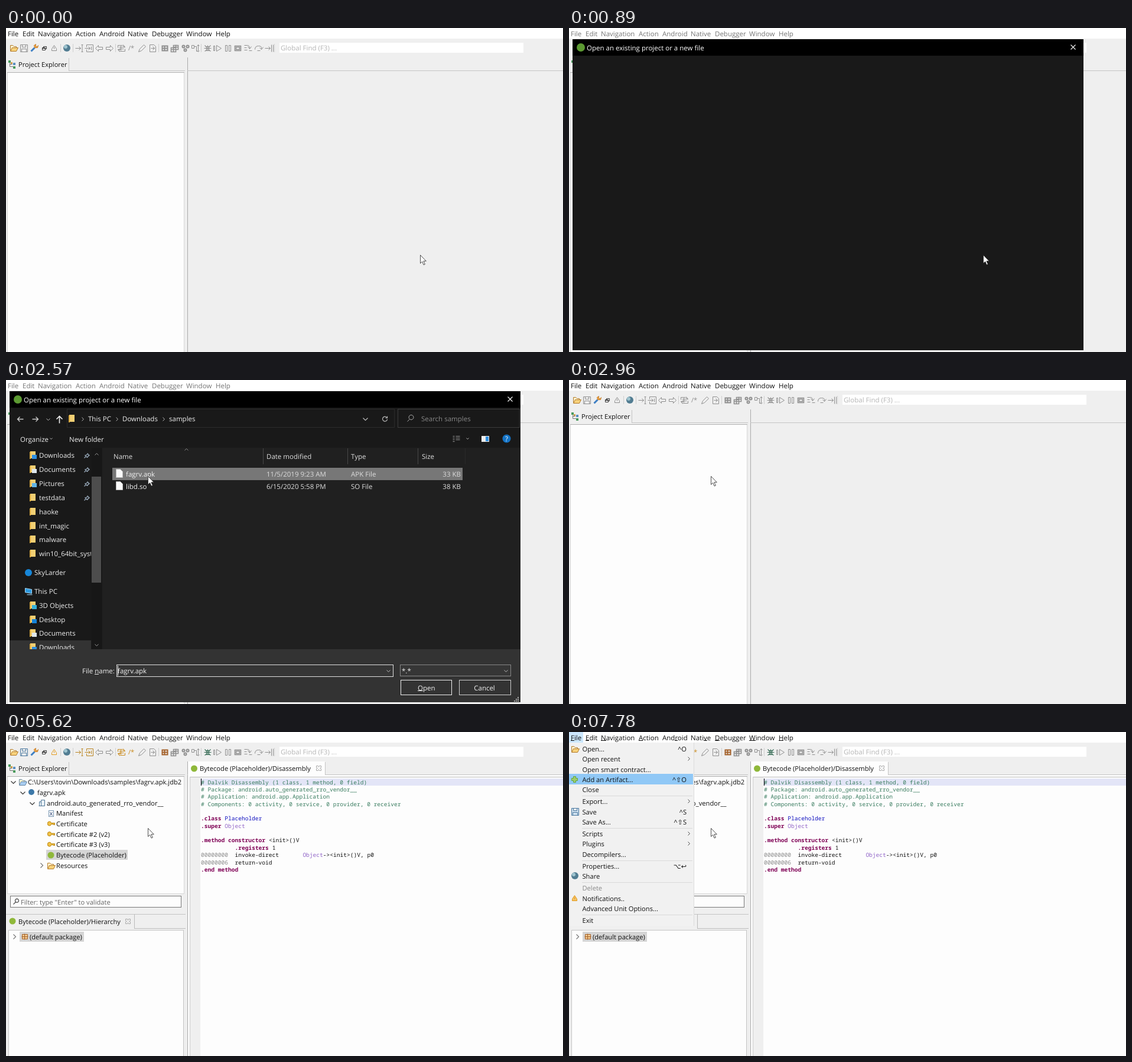
An HTML page with a canvas for the animation above (8000 ms loop, 943 px wide and 550 px high).

```html
<!DOCTYPE html>
<html lang="en">
<head>
<meta charset="utf-8">
<title>Opening a project</title>
<style>
  html, body { margin: 0; width: 100%; height: 100%; overflow: hidden; background: #efefef; }
  canvas { display: block; }
</style>
</head>
<body>
<canvas id="stage" width="943" height="550"></canvas>
<script>
const ctx = document.getElementById('stage').getContext('2d');
const uiFont = size => `${size}px "Open Sans", "DejaVu Sans", sans-serif`;
const PANEL = uiFont(11.15), WINDOW = uiFont(11.5);
const MONO = '9.57px "Noto Sans Mono", monospace';
const GREY = '#8f8f8f';
let face = PANEL;

// ---- drawing helpers (text is placed by its vertical centre) ----
function rect(x, y, w, h, color) {
  ctx.fillStyle = color;
  ctx.fillRect(x, y, w, h);
}
function frame(x, y, w, h, color, fill) {
  if (fill) rect(x, y, w, h, fill);
  ctx.lineWidth = 1;
  ctx.strokeStyle = color;
  ctx.strokeRect(x + .5, y + .5, w - 1, h - 1);
}
function text(s, x, y, color = '#111', align = 'left', font = face) {
  ctx.font = font;
  ctx.fillStyle = color;
  ctx.textAlign = align;
  ctx.fillText(s, x, y + 4);
}
function underline(s, i, x, y, color = '#111') {
  ctx.font = face;
  const from = ctx.measureText(s.slice(0, i)).width;
  rect(Math.round(x + from), y + 4, Math.round(ctx.measureText(s[i]).width), 1, color);
}
function shape(x, y, d, stroke, fill, width = 1) {
  const path = new Path2D(d);
  ctx.save();
  ctx.translate(x + .5, y + .5);
  if (fill) { ctx.fillStyle = fill; ctx.fill(path); }
  if (stroke) { ctx.strokeStyle = stroke; ctx.lineWidth = width; ctx.stroke(path); }
  ctx.restore();
}
function dot(x, y, r, color) {
  ctx.fillStyle = color;
  ctx.beginPath();
  ctx.arc(x, y, r, 0, 7);
  ctx.fill();
}

// ---- icons ----
const DISK = 'M-6-6h12v12h-12zM-3-6v4h6v-4M-4 6v-5h8v5';
const WARN = 'M0-5l4 6v3h-8v-3zM0-2v3';
const PAGE = 'M-5-7h7l4 4v10h-11z';
const GRID = 'M-4-4h9v8h-9zM0-5v10M-5 0h11';
const chevron = {
  right: (x, y, c = '#777') => shape(x, y, 'M-2-4l4 4l-4 4', c, null, 1.2),
  down: (x, y, c = '#333') => shape(x, y, 'M-4-2l4 4l4-4', c, null, 1.2),
  up: (x, y, c) => shape(x, y, 'M-3 2l3-3l3 3', c)
};
function folder(x, y, fill = '#f7d27c', line = '#b27a28') {
  shape(x, y, 'M-6 4v-9h4l2 2h4v2', line, '#fff3cf');
  shape(x, y, 'M-6 5l3-6h10l-3 6z', line, fill);
}
function globe(x, y) {
  dot(x, y, 6, '#527d92');
  dot(x - 2, y - 2, 3, '#9fc4cf');
}
function key(x, y) {
  shape(x, y, 'M-6 0a3 3 0 0 1 6-1h6v3h-2v-1h-4a3 3 0 0 1-6-1z', '#b98512', '#f2c347');
}
function closeMark(x, y) {
  shape(x, y, 'M-4-4h3l1 2l1-2h3v3l-2 1l2 1v3h-3l-1-2l-1 2h-3v-3l2-1l-2-1z', '#aaa');
}
function pointer(x, y) {
  shape(x, y, 'M0 0v14l3.2-3 2.4 5.6 2.2-1-2.4-5.4h4.4z', '#222', '#fff', .8);
}

// x, path, colour once a project is open, line width
const tools = [
  [30, DISK, '#48779f'],
  [65, 'M-4-1h5v4h-5zM-4 0h5M-2-1v-2h5v4h-2', '#333'],
  [81, WARN, '#e39a1c'],
  [123, 'M-6 0h9M0-3l3 3l-3 3M4-6h3M4 6h3M5.5-6v12', '#b9831e'],
  [140, 'M-4-2v-4h11v12h-11v-4M-7 0h9M-1-3l3 3l-3 3M4-3v6', '#b9831e'],
  [157, 'M-6 0l5-5v3h7v4h-7v3z'],
  [175, 'M6 0l-5-5v3h-7v4h7v3z'],
  [195, 'M-6-1l0-4h8l4 3M3-6l3 4h-4M6 1v4h-8l-4-3M-3 6l-3-4h4M-4-2h8M-4 1h8M-1-4v8', '#c98a1c'],
  [230, 'M-6 6l2-5l7-7l3 3l-7 7z'],
  [248, 'M-5-6h7l3 3v9h-10zM-3 0h6M0-3l3 3l-3 3'],
  [268, GRID, '#a4622c', 2],
  [285, 'M-6-1h8v7h-8zM-2-1v7M-6 2h8M-2-1v-4h8v7h-4M2-6v4M-2-2h8', 0, 1.6],
  [303, 'M-5-3a2 2 0 1 0 4 0a2 2 0 1 0-4 0M2-3a2 2 0 1 0 4 0a2 2 0 1 0-4 0M-2 3a2 2 0 1 0 4 0a2 2 0 1 0-4 0', 0, 2],
  [320, 'M-6-5h4v5h-4zM-2-3h4v8h2M5-6v11M3-4l2-2l2 2M3 4l2 2l2-2'],
  [341, 'M-2-3h4v7h-4zM-5-5l3 3M5-5l-3 3M-6 0h12M-5 5l3-2M5 5l-3-2M0-5v9', '#356b55', 1.2],
  [358, 'M-7-4h2v8h-2zM-2-5l8 5l-8 5z'],
  [375, 'M-4-5h3v10h-3zM2-5h3v10h-3z'],
  [392, 'M-5-4h10v8h-10zM-3-2h6v4h-6z', 0, 1.5],
  [409, 'M-6-5h5q4 0 4 5M0-3l3 4l3-4M-6-1h4M-6 3h5M2 4h5'],
  [427, 'M-6 2q0-6 6-6t5 5M2-1l3 3l3-4M-2 4h5'],
  [445, 'M-7 0h9M-1-3l3 3l-3 3M4-6v12M7-6v12']
];

const menus = [['File', 3, 0], ['Edit', 28, 0], ['Navigation', 54, 0], ['Action', 118, 0], ['Android', 158, 3],
  ['Native', 206, 4], ['Debugger', 247, 0], ['Window', 305, 0], ['Help', 355, 0]];

function menuBar(t) {
  const modal = (t >= 890 && t < 2960) || (t >= 3450 && t < 3830);
  const mnemonics = (t >= 390 && t < 890) || t >= 6720;
  face = WINDOW;
  rect(0, 0, 943, 18, '#fff');
  if ((t >= 590 && t < 890) || t >= 6800) rect(0, 0, 24, 18, '#cce8ff');
  for (const [name, x, i] of menus) {
    text(name, x, 10, modal ? '#757575' : '#111');
    if (mnemonics) underline(name, i, x, 10);
  }
  face = PANEL;
}

function toolBar(loaded) {
  folder(13, 34);
  for (const [x, d, active, width] of tools) {
    shape(x, 34, d, active && (loaded || x === 65) ? active : GREY, null, width);
  }
  shape(47, 34, 'M-5 5l6-6', '#3d7fc4', null, 3);
  shape(47, 34, 'M1-1l-1-4l3-2v4h3l1-2l-1 4z', '#c77f2a', '#f0a84b');
  globe(103, 34);
  text('/*', 207, 34, loaded ? '#c98a1c' : GREY);
  for (const x of [92, 113, 185, 258, 330, 454]) rect(x, 27, 1, 14, '#cfcfcf');
  rect(463, 25, 413, 17, '#fff');
  text('Global Find (F3) ...', 465, 34, '#b5b5b5', 'left', WINDOW);
}

function shell(loaded) {
  rect(0, 18, 943, 532, '#efefef');
  toolBar(loaded);
  rect(307, 50, 1, 500, '#aaa');
  rect(307, 72, 636, 1, '#c4c4c4');
  rect(106, 51, 1, 22, '#c4c4c4');
  rect(106, 72, 197, 1, '#c4c4c4');
  shape(10, 61, 'M-4-2v6h7M0 0h-4', '#777');
  rect(4, 55, 4, 4, '#4a9a5c');
  rect(8, 58, 3, 3, '#d2a04a');
  rect(12, 59, 4, 4, '#5a8fc0');
  rect(12, 65, 4, 4, '#4a9a5c');
  text('Project Explorer', 21, 62);
  frame(2, 75, 300, 480, '#d6d6d6', '#fdfdfd');
  rect(2, 75, 300, 1, '#b0b0b0');
}

function projectRoot(open) {
  (open ? chevron.down : chevron.right)(12, 85);
  folder(28, 85, '#a9cdf0', '#6788a6');
  text('C:\\Users\\tovin\\Downloads\\samples\\fagrv.apk.jdb2', 37, 85);
}

function tree() {
  chevron.down(28, 103);
  dot(43, 102, 5, '#3d78a8');
  text('fagrv.apk', 53, 103);
  chevron.down(44, 121);
  shape(61, 120, 'M-2-5h6v10h-6zM-5 5v-7h3M-6 5h5', '#4d7392', '#e8f1f8');
  text('android.auto_generated_rro_vendor__', 69, 121);
  frame(72, 133, 9, 11, '#7594b0', '#fff');
  text('x', 73.5, 138, '#263f70');
  text('Manifest', 85, 138);
  ['Certificate', 'Certificate #2 (v2)', 'Certificate #3 (v3)'].forEach((s, i) => {
    key(76, 155 + i * 17.6);
    text(s, 85, 156 + i * 17.6);
  });
  rect(68, 200, 138, 17, '#d5d5d5');
  dot(76, 209, 5.5, '#8fb83a');
  text('Bytecode (Placeholder)', 85, 209);
  chevron.right(60, 226);
  folder(76, 227);
  text('Resources', 85, 227);
  rect(0, 275, 303, 33, '#efefef');
  rect(2, 274, 300, 1, '#d6d6d6');
  frame(7, 278, 290, 20, '#777', '#fdfdfd');
  shape(17, 287, 'M-5 5l4-4M-1 1a3 3 0 1 1 4 0a3 3 0 0 1-4 0', '#555', null, 1.3);
  text('Filter: type "Enter" to validate', 25, 289, '#666');
}

function hierarchy(filled) {
  rect(0, 308, 304, 242, '#efefef');
  rect(0, 309, 304, 1, '#c4c4c4');
  rect(217, 309, 1, 24, '#bbb');
  rect(217, 333, 87, 1, '#bbb');
  dot(11, 321, 5.5, '#8fb83a');
  text('Bytecode (Placeholder)/Hierarchy', 21, 322);
  closeMark(206, 321);
  frame(4, 336, 297, 220, '#c4c4c4', '#fdfdfd');
  if (!filled) return;
  chevron.right(14, 347);
  rect(23, 339, 109, 17, '#d5d5d5');
  shape(31, 347, GRID, '#a4622c', '#efc58b');
  text('(default package)', 40, 348);
}

const GREEN = '#3a7d60', KEYWORD = '#7f0055', BLUE = '#1212c0', PURPLE = '#9266c8', ADDRESS = '#8a8a8a', PLAIN = '#111';
// row, column, text, colour
const code = [
  [0, 0, '# Dalvik Disassembly (1 class, 1 method, 0 field)', GREEN],
  [1, 0, '# Package: android.auto_generated_rro_vendor__', GREEN],
  [2, 0, '# Application: android.app.Application', GREEN],
  [3, 0, '# Components: 0 activity, 0 service, 0 provider, 0 receiver', GREEN],
  [5, 0, '.class', KEYWORD], [5, 7, 'Placeholder', BLUE],
  [6, 0, '.super', KEYWORD], [6, 7, 'Object', PURPLE],
  [8, 0, '.method constructor', KEYWORD], [8, 20, '<init>()V', PLAIN],
  [9, 10, '.registers', KEYWORD], [9, 21, '1', PLAIN],
  [10, 0, '00000000', ADDRESS], [10, 10, 'invoke-direct', PLAIN], [10, 30, 'Object', PURPLE], [10, 36, '-><init>()V, p0', PLAIN],
  [11, 0, '00000006', ADDRESS], [11, 10, 'return-void', PLAIN],
  [12, 0, '.end method', KEYWORD]
];

function editor(t) {
  rect(308, 50, 232, 23, '#fdfdfd');
  rect(540, 51, 1, 21, '#c4c4c4');
  rect(308, 73, 635, 477, '#fdfdfd');
  rect(311, 76, 632, 1, '#bbb');
  rect(311, 76, 1, 474, '#ccc');
  rect(312, 77, 17, 473, '#efefef');
  dot(318.5, 62, 5.5, '#8fb83a');
  text('Bytecode (Placeholder)/Disassembly', 328, 62);
  closeMark(529, 61);
  if (t < 4620) return;
  rect(329, 79, 614, 12, '#e3e5f7');
  for (const [row, col, s, color] of code) {
    text(s, 330 + col * 5.746, 84.5 + row * 12.37, color, 'left', (color === KEYWORD ? 'bold ' : '') + MONO);
  }
  if (t < 5210 || (t >= 5620 && t < 6210) || t >= 6720) rect(330, 79, 1, 12, '#000');
}

// label, y, shortcut, 1 = needs an open project, 2 = never enabled
const fileItems = [
  ['Open...', 29, '^O'], ['Open recent', 46, '>'], ['Open smart contract...', 63.5], ['Add an Artifact...', 81, '^⇧O', 1],
  ['Close', 98, '', 1], ['Export...', 118, '>', 1], ['Save', 135.5, '^S', 1], ['Save As...', 153, '^⇧S', 1],
  ['Scripts', 173, '>'], ['Plugins', 190, '>'], ['Decompilers...', 208], ['Properties...', 228, '⌥↩', 1],
  ['Share', 245], ['Delete', 265, '', 2], ['Notifications..', 283, '', 1], ['Advanced Unit Options...', 300, '', 1], ['Exit', 320]
];

function fileMenu(t, loaded) {
  const selected = t < 590 ? -1 : t < 6720 ? 0 : t < 6800 ? -1 : t < 7200 ? 0 : t < 7380 ? 1 : t < 7780 ? 2 : 3;
  rect(0, 18, 212, 311, '#f1f1f1');
  rect(211, 18, 1, 311, '#dcdcdc');
  for (const y of [108, 163, 218, 255, 310]) rect(22, y, 187, 1, '#dadada');
  fileItems.forEach(([label, y, hint, need], i) => {
    const color = need === 2 || (need && !loaded) ? '#888' : '#111';
    if (i === selected) rect(0, Math.round(y - 10), 210, 18, '#90c8f6');
    text(label, 22.5, y, color);
    if (hint === '>') shape(202, y - 1, 'M-1-3l3 3l-3 3', '#444');
    else if (hint) text(hint, 199, y, color, 'right');
  });
  folder(10, 29);
  shape(9, 80, 'M-2-5h4v3h3v4h-3v3h-4v-3h-3v-4h3z', loaded ? '#62a83c' : '#aaa', loaded ? '#9bcb6c' : '#ccc');
  shape(10, 135, DISK, loaded ? '#48779f' : '#aaa', loaded ? '#cfe0ee' : null);
  globe(10, 244);
  shape(9, 282, WARN, loaded ? '#e39a1c' : '#aaa', loaded ? '#f3c266' : null);
}

// label, x, y, icon accent
const places = [
  ['Downloads', 56, 128, '#2f8fe0'], ['Documents', 56, 152, '#dfe8ee'], ['Pictures', 56, 176, '#63b5e8'], ['testdata', 56, 200],
  ['haoke', 56, 224], ['int_magic', 56, 248], ['malware', 56, 271], ['win10_64bit_syst', 56, 295],
  ['SkyLarder', 48, 327], ['This PC', 48, 359], ['3D Objects', 56, 383, '#35b0d8'], ['Desktop', 56, 407, '#1683d8'],
  ['Documents', 56, 430, '#dfe8ee'], ['Downloads', 56, 454, '#2f8fe0']
];

function sidebar() {
  ctx.save();
  ctx.beginPath();
  ctx.rect(6, 115, 138, 342);
  ctx.clip();
  rect(6, 442, 138, 15, '#333');
  for (const [label, x, y, accent] of places) {
    text(label, x, y, '#eee');
    if (x === 48) continue;
    rect(41, y - 7, 9, 12, '#f2cf73');
    rect(40, y - 6, 2, 12, '#d9a93e');
    if (accent) rect(44, y - 1, 8, 7, accent);
  }
  dot(38, 327, 6, '#1787d9');
  shape(38, 358, 'M-6-5l11 2v7l-11-2zM-3 6h9', '#a8d8f5', '#2e9ae0');
  for (const y of [128, 152, 176, 200]) shape(136, y, 'M-4 4l3-3M-3-1l4 4M-2 0l4-3l2 2l-3 4M1-4l4 4', '#9ab', null, 1.3);
  ctx.restore();
  rect(145, 115, 17, 342, '#171717');
  rect(145, 164, 16, 180, '#4d4d4d');
  chevron.up(153, 125, '#999');
  shape(153, 449, 'M-3-1l3 3l3-3', '#999');
}

function fileList(t) {
  rect(163, 115, 708, 342, '#202020');
  for (const x of [435, 578, 697, 777]) rect(x, 116, 1, 27, x === 777 ? '#2a2a2a' : '#484848');
  chevron.up(305, 117, '#888');
  [['Name', 182], ['Date modified', 441], ['Type', 584], ['Size', 704]].forEach(([s, x]) => text(s, x, 130, '#ddd'));
  if (t >= 2260) rect(180, 149, 593, 21, t < 2570 ? '#4d4d4d' : '#777');
  [['fagrv.apk', '11/5/2019 9:23 AM', 'APK File', '33 KB'], ['libd.so', '6/15/2020 5:58 PM', 'SO File', '38 KB']].forEach((row, i) => {
    const y = 160 + i * 21.3;
    shape(191, Math.round(y) - 2, PAGE, '#bbb', '#fafafa');
    text(row[0], 203, y, '#f2f2f2');
    text(row[1], 441, y, '#ddd');
    text(row[2], 584, y, '#ddd');
    text(row[3], 770, y, '#ddd', 'right');
  });
}

function addressBar() {
  frame(103, 49, 555, 32, '#2b2b2b');
  frame(663, 49, 207, 32, '#3c3c3c');
  shape(24, 66, 'M5 0h-10M-1-4l-4 4l4 4', '#ccc', null, 1.3);
  shape(49, 66, 'M-5 0h10M1-4l4 4l-4 4', '#ccc', null, 1.3);
  shape(71, 66, 'M-3-1l3 3l3-3', '#bbb');
  shape(90, 67, 'M0 6v-12M-5-1l5-5l5 5', '#eee', null, 1.6);
  rect(107, 59, 9, 12, '#f2cf73');
  rect(106, 60, 2, 12, '#d9a93e');
  for (const x of [129, 187, 266]) shape(x, 66, 'M-1-3l3 3l-3 3', '#bbb');
  text('This PC', 139, 66, '#eee');
  text('Downloads', 197, 66, '#eee');
  text('samples', 276, 66, '#eee');
  chevron.down(608, 66, '#bbb');
  shape(641, 66, 'M3-3a4 4 0 1 0 1 3M4-5v3h-3', '#bbb', null, 1.2);
  shape(684, 65, 'M-5 5l4-4M-1 1a4 4 0 1 1 5 0a4 4 0 0 1-5 0', '#aaa');
  text('Search samples', 703, 66, '#888');
  text('Organize', 24, 101, '#eee');
  shape(76, 99, 'M-2-1l2 2l2-2', '#bbb');
  text('New folder', 107, 101, '#eee');
  shape(762, 99, 'M-6-4h3M-1-4h7M-6-1h3M-1-1h7M-6 2h3M-1 2h7M-6 5h3', '#999');
  shape(781, 99, 'M-2-1l2 2l2-2', '#bbb');
  rect(805, 95, 13, 10, '#eee');
  rect(812, 96, 5, 8, '#2f8fe0');
  dot(847.5, 99.5, 7, '#1473c5');
  text('?', 847.5, 100, '#fff', 'center');
}

function fileNameArea(t) {
  rect(6, 457, 865, 90, '#333');
  text('File name:', 129, 494, '#eee');
  underline('File name:', 5, 129, 495, '#eee');
  frame(187, 483, 469, 21, '#e0e0e0', '#363636');
  frame(667, 483, 188, 20, '#888', '#363636');
  shape(647, 493, 'M-3-1l3 3l3-3', '#bbb');
  shape(846, 493, 'M-3-1l3 3l3-3', '#bbb');
  if (t >= 2570) text('fagrv.apk', 189, 494, '#f2f2f2');
  if (t < 1580 || t >= 2070) rect(189, 485, 1, 17, '#eee');
  text('*.*', 670, 494, '#eee');
  frame(668, 509, 87, 26, '#f0f0f0');
  frame(767, 509, 88, 26, '#d0d0d0');
  text('Open', 697, 523, '#f2f2f2');
  underline('Open', 0, 697, 523, '#f2f2f2');
  text('Cancel', 810, 523, '#f2f2f2', 'center');
  for (let i = 0; i < 3; i++) for (let j = 2 - i; j < 3; j++) rect(860 + j * 3, 538 + i * 3, 2, 2, '#aaa');
}

function openDialog(t) {
  face = WINDOW;
  rect(6, 19, 865, 528, '#191919');
  rect(6, 19, 865, 28, '#000');
  dot(20, 33, 7, '#5c9a32');
  text('Open an existing project or a new file', 30, 34, '#fff');
  shape(853, 32, 'M-4-4l8 8M4-4l-8 8', '#eee', null, 1.2);
  if (t >= 1180) {
    addressBar();
    sidebar();
    fileList(t);
    fileNameArea(t);
  }
  face = PANEL;
}

function loadingPanel() {
  frame(252, 97, 700, 460, '#b0b0b0', '#f0f0f0');
  rect(253, 98, 690, 28, '#fff');
}

function draw(t) {
  const loaded = t >= 4530;
  ctx.textRendering = 'geometricPrecision';
  shell(loaded);
  menuBar(t);
  if (t >= 3630) projectRoot(t >= 4330);
  if (t >= 4330) tree();
  if (loaded) {
    hierarchy(t >= 4620);
    editor(t);
  }
  if ((t >= 390 && t < 680) || t >= 6720) fileMenu(t, loaded);
  if (t >= 890 && t < 2960) openDialog(t);
  if (t >= 3170 && t < 3830) loadingPanel();
  if (t < 1870) pointer(701, 385);
  else if (t < 2070) pointer(596, 375);
  else if (t < 2260) pointer(336, 220);
  else pointer(240, 163);
}

const start = performance.now();
function tick() {
  draw((performance.now() - start) % 8000);
  requestAnimationFrame(tick);
}
tick();
</script>
</body>
</html>
```
